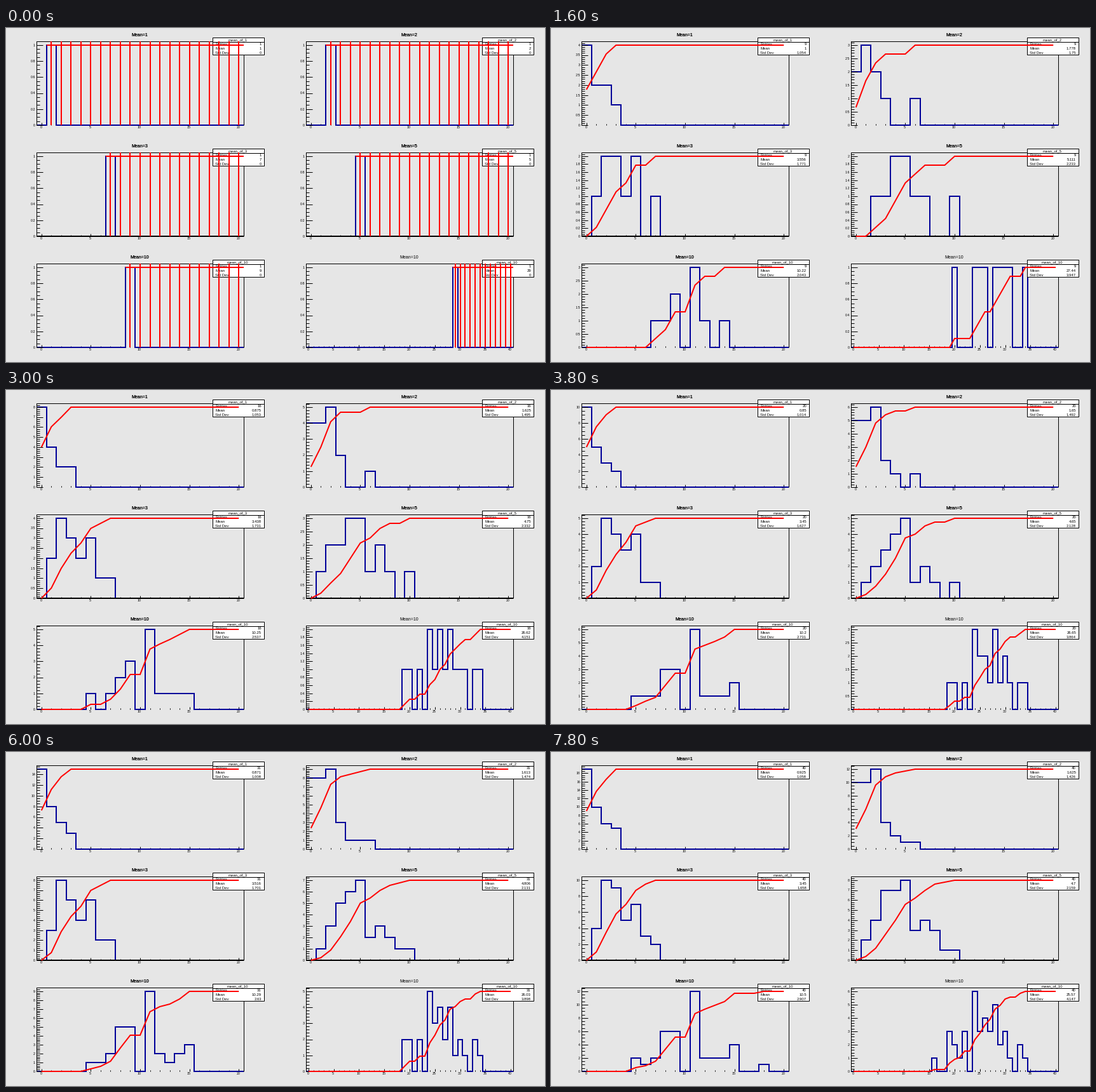
These frames come from a looping animation (848x526 px, 8000 ms). A matplotlib script:

```python
import math

import matplotlib.pyplot as plt
import numpy as np
from matplotlib.animation import FuncAnimation
from matplotlib.patches import Rectangle

W, H, DPI = 848, 526, 100
PX = 72 / DPI
FRAMES, STEP_MS = 40, 200
BLUE, RED, GREY = "#000099", "#ff0000", "#e6e6e6"
BOX_W, BOX_H, PEAK_H = 326, 132, 126.2
GOLDEN = (math.sqrt(5) - 1) / 2

plt.rcParams["font.family"] = "Liberation Sans"
fig = plt.figure(figsize=(W / DPI, H / DPI), dpi=DPI, facecolor=GREY)
ax = fig.add_axes([0, 0, 1, 1])
ax.set_xlim(0, W)
ax.set_ylim(H, 0)
ax.axis("off")


def label(x, y, text, size, ha="center", z=5):
    """Text whose capitals are centred on y; sizes are in pixels."""
    return ax.text(x, y + 0.36 * size, text, fontsize=size * PX, ha=ha,
                   va="baseline", color="black", zorder=z)


def line(x, y, color="black", width=1, z=2):
    return ax.plot(x, y, color=color, lw=width * PX, zorder=z,
                   solid_capstyle="butt", solid_joinstyle="miter")[0]


def ticks(segments, z=4):
    """Many separate strokes as one line, split by gaps."""
    xs, ys = [], []
    for x0, y0, x1, y1 in segments:
        xs += [x0, x1, np.nan]
        ys += [y0, y1, np.nan]
    return line(xs, ys, z=z)


def nice(width):
    """Round a division width up to a tidy step."""
    power = 10 ** math.floor(math.log10(width) + 1e-9)
    lead = width / power
    for limit, step in ((1.001, 1), (2.5, 2), (5.001, 5)):
        if lead <= limit:
            return step * power
    return 10 * power


def arrivals(first, low, totals, shift):
    """Order the draws so that every bin fills evenly towards its total."""
    timed = []
    for value, total in enumerate(totals, low):
        phase = (value * GOLDEN + shift) % 1
        timed += [((k + phase) / total, value) for k in range(total)]
    order = [value for _, value in sorted(timed)]
    order.remove(first)
    return np.array([first] + order)


class Panel:
    def __init__(self, col, row, mean, first, low, totals, shift=0, bins=21):
        self.x0 = 48 + 424 * col
        self.y0 = 153 + 175 * row
        self.top = self.y0 - BOX_H
        self.right = self.x0 + BOX_W
        self.bins = bins
        self.draws = arrivals(first, low, totals, shift)
        self.edges = self.x0 + np.arange(bins + 1) * BOX_W / bins
        self.mids = (self.edges[:-1] + self.edges[1:]) / 2

        line([self.x0, self.x0, self.right, self.right],
             [self.y0, self.top, self.top, self.y0])
        line([self.x0, self.x0], [self.top, self.y0], z=4)
        if row == 1:
            line([self.x0, self.right], [self.y0, self.y0], width=2, z=4)
        ticks([(x, self.y0, x, self.y0 - (2 if i % 5 else 4))
               for i, x in enumerate(self.mids)], z=2)
        for i in range(0, bins, 5):
            label(self.mids[i] - 1, self.y0 + 3.5, str(i), 5.3)
        for _ in range(1 if bins > 21 else 2):
            label(self.x0 + 162.5, self.y0 - 143, f"Mean={mean}", 7)
        self.stat_box(mean)

    def stat_box(self, mean):
        self.sx, self.sy = self.x0 + 277, self.y0 - 138
        ax.add_patch(Rectangle((self.sx, self.sy), 81, 27, fc="white",
                               ec="black", lw=PX, zorder=6))
        line([self.sx, self.sx + 81], [self.sy + 7, self.sy + 7], z=7)
        label(self.sx + 39.5, self.sy + 3.4, f"mean_of_{mean}", 6, z=7)
        for i, name in enumerate(("Entries", "Mean", "Std Dev")):
            self.stat(i, name, 4, "left")

    def stat(self, row, text, dx, ha):
        return label(self.sx + dx, self.sy + 10.1 + 6.75 * row, text, 6, ha, 7)

    def draw(self, n):
        data = self.draws[:n]
        counts = np.bincount(data, minlength=self.bins)
        peak = counts.max()
        scale = PEAK_H / peak
        art = [line(np.repeat(self.edges, 2)[1:-1],
                    self.y0 - np.repeat(counts, 2) * scale, BLUE, 2, 3)]
        art += self.y_axis(peak, scale)
        for i, value in enumerate((n, data.mean(), data.std())):
            art.append(self.stat(i, f"{value:.4g}", 77, "right"))
        total = np.cumsum(counts) / n
        if n == 1:
            art += self.error_bars(int(np.argmax(total > 0)))
        else:
            art.append(line(self.mids, np.round(self.y0 - total * PEAK_H),
                            RED, 2, 8))
        return art

    def y_axis(self, peak, scale):
        limit = BOX_H / scale
        major = nice(1.05 * peak / 10)
        minor = nice(major / 5)
        per = round(major / minor)
        segments, art = [], []
        for i in range(int(limit / minor + 1e-6) + 1):
            y = self.y0 - i * minor * scale
            size = 5 if i % per else 10
            segments.append((self.x0, y, self.x0 + size, y))
            if i % per == 0:
                art.append(label(self.x0 - 2, y, f"{i * minor:.3g}", 5.3,
                                 "right"))
        return art + [ticks(segments)]

    def error_bars(self, first):
        y = self.y0 - PEAK_H
        art = [line([self.edges[first], self.right], [y, y], RED, 2, 8)]
        for x in self.mids[first:]:
            art.append(line([x, x], [self.y0, self.top], RED, 2, 8))
        return art


# column, row, mean, first draw, lowest bin, final bin heights
panels = [
    Panel(0, 0, 1, 1, 0, [19, 10, 6, 5]),
    Panel(1, 0, 2, 2, 0, [10, 10, 12, 4, 2, 1, 1], shift=0.4),
    Panel(0, 1, 3, 7, 1, [4, 10, 9, 5, 7, 3, 2]),
    Panel(1, 1, 5, 5, 1, [2, 4, 7, 7, 8, 3, 4, 3, 1, 1]),
    Panel(0, 2, 10, 9, 5, [2, 1, 2, 6, 6, 0, 12, 2, 2, 2, 4, 0, 0, 1],
          shift=0.72),
    Panel(1, 2, 10, 29, 16, [1, 0, 0, 3, 2, 1, 3, 0, 6, 3, 4, 3, 5, 2, 3, 1,
                             0, 2, 1], bins=41),
]
live = []


def reset():
    while live:
        live.pop().remove()
    return []


def update(i):
    reset()
    for panel in panels:
        live.extend(panel.draw(i + 1))
    return live


anim = FuncAnimation(fig, update, frames=FRAMES, init_func=reset,
                     interval=STEP_MS, repeat=True, repeat_delay=0, blit=False)
plt.show()
```
